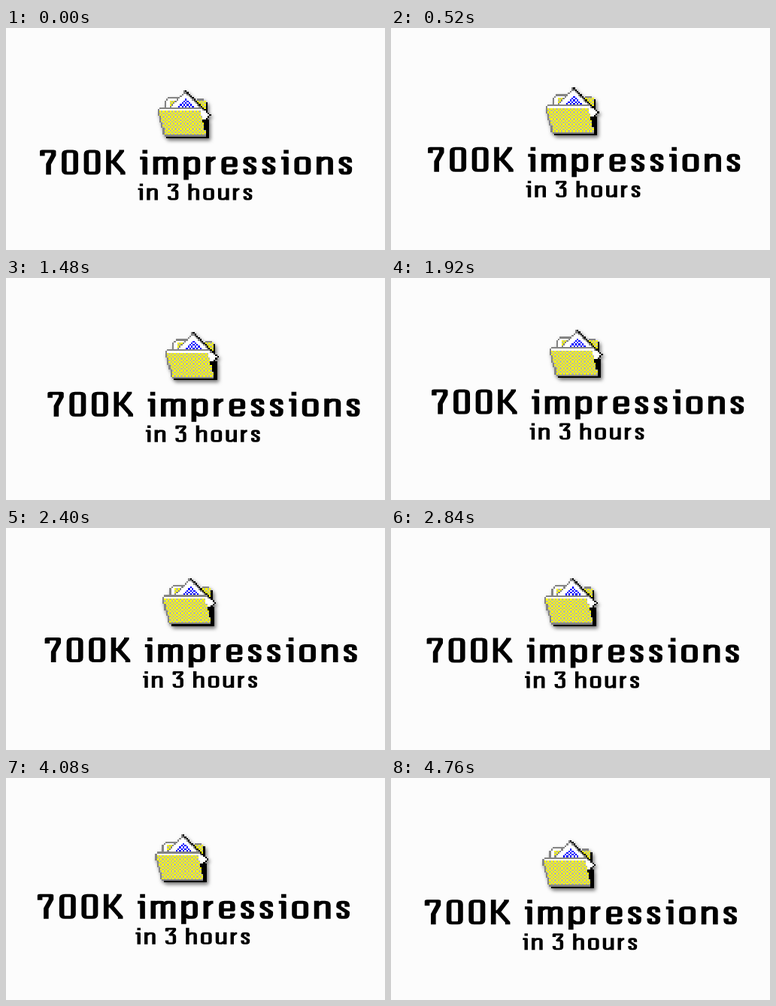
These frames come from a looping animation (504 px wide and 296 px high, 4800 ms). An HTML page with a canvas:

```html
<!DOCTYPE html>
<html lang="en">
<head>
<meta charset="utf-8">
<title>700K impressions</title>
<style>
html, body { margin: 0; width: 100%; height: 100%; overflow: hidden; background: #fcfcfc; }
canvas { display: block; }
</style>
</head>
<body>
<canvas id="stage" width="504" height="296">700K impressions in 3 hours</canvas>
<script>
const ctx = document.getElementById('stage').getContext('2d');
const LOOP = 4800, STEP = 40;

// Drift of the whole group, evenly spaced over one loop.
const driftX = [0, 3, 6.8, 10.2, 10.1, 8.7, 6.6, 3, -1.5, -4.4, -3.5, -1.7];
const driftY = [0, -2.8, -5.7, -8.7, -11.7, -14.4, -16.4, -16.2, -14.2, -11.5, -8.4, -4.2];

function spline(points, phase) {
  const n = points.length, i = Math.floor(phase * n), u = phase * n - i;
  const [a, b, c, d] = [-1, 0, 1, 2].map(k => points[(i + k + n) % n]);
  return b + u / 2 * (c - a + u * (2 * a - 5 * b + 4 * c - d + u * (3 * (b - c) + d - a)));
}

// Centre lines of the letters, drawn with a wide pen; baseline at y = 0.
const PEN = 4, STRETCH = 1.65, GAP = 4.6, SPACE = 11.8;
const arch = 'L4-22H6.8Q9.3-22 9.3-18V';
const glyph = (span, path) => ({ width: span + PEN, path: new Path2D(path) });
const ring = top => `M2.5-${top}H6.8Q9.3-${top} 9.3-${top - 4}V-6Q9.3-2 6.8-2H2.5Q0-2 0-6V-${top - 4}Q0-${top} 2.5-${top}Z`;
const glyphs = {
  7: glyph(9, 'M0-25V-31H9V-26L5-14V0'),
  0: glyph(9.3, ring(31)),
  3: glyph(9, 'M0-26V-31H9V-28L4-19H6.5Q9-19 9-15V-6Q9-2 6.5-2H2.5Q0-2 0-6V-8'),
  K: glyph(11.5, 'M0-33V0M0-17H4M10.5-33V-31L4-17L11.5-3V0'),
  i: glyph(2, 'M-2-22H2V0M2-33V-28'),
  m: glyph(16, 'M0-24V0M0-19L3-22H6Q8-22 8-19V0M8-19L11-22H14Q16-22 16-19V0'),
  n: glyph(9.3, 'M0-24V0M0-18' + arch + '0'),
  h: glyph(9.3, 'M0-33V0M0-18' + arch + '0'),
  p: glyph(9.3, 'M0-24V7M0-18' + arch + '-6Q9.3-2 6.8-2H4L0-6'),
  r: glyph(3.9, 'M0-24V0M0-17L4-22H5.9'),
  e: glyph(9, 'M0-12H9V-18Q9-22 6.5-22H2.5Q0-22 0-18V-6Q0-2 2.5-2H6.5Q9-2 9-6V-7'),
  s: glyph(6.7, 'M6.7-16V-18Q6.7-22 4.5-22H2.2Q0-22 0-18V-16L6.7-9V-6Q6.7-2 4.5-2H2.2Q0-2 0-6V-8'),
  o: glyph(9.3, ring(22)),
  u: glyph(9.3, 'M0-24V-6Q0-2 2.5-2H5L9.3-6M9.3-24V0')
};

function drawText(text, x, baseline, size) {
  ctx.save();
  ctx.translate(x, baseline);
  ctx.scale(size * STRETCH, size);
  ctx.translate(PEN / 2, 0);
  ctx.lineWidth = PEN;
  ctx.lineJoin = 'round';
  for (const char of text) {
    if (char === ' ') {
      ctx.translate(SPACE - GAP, 0);
      continue;
    }
    ctx.stroke(glyphs[char].path);
    ctx.translate(glyphs[char].width + GAP, 0);
  }
  ctx.restore();
}

function makeFolder() {
  const icon = document.createElement('canvas');
  icon.width = 31;
  icon.height = 28;
  const g = icon.getContext('2d');
  const box = (color, x, y, w = 1, h = 1) => {
    g.fillStyle = color;
    g.fillRect(x, y, w, h);
  };
  const checker = (a, b, x, y, w, h = 1) => {
    for (let j = y; j < y + h; j++)
      for (let i = x; i < x + w; i++) box((i + j) % 2 ? a : b, i, j);
  };
  const yellow = '#ffff00', silver = '#bcbc98', gray = '#848484';

  // Back of the folder with its two tabs
  box(gray, 6, 4, 6);
  box(gray, 5, 5);
  box(gray, 4, 6, 1, 5);
  box('#fff', 6, 5, 6);
  box('#fff', 5, 6, 7, 5);
  checker(yellow, silver, 7, 6, 4, 5);
  checker(yellow, silver, 22, 6, 6, 8);
  box(gray, 23, 5, 4);
  box('#000', 28, 7, 1, 20);

  // Tilted sheet
  for (let y = 0; y < 18; y++) {
    const left = y < 12 ? 16 - y : 8 + (y - 12) * 3.2 | 0;
    const right = y < 15 ? 16 + y : 30 - (y - 14);
    box('#fff', left, y, Math.max(0, right - left));
    if (y < 12) box(gray, left, y);
    box('#000', Math.min(right, 30), y);
    if (y < 12) box(gray, right - 1, y);
  }
  for (let y = 5; y < 11; y++) {
    const half = Math.min(4, y - 4);
    checker('#0000ff', '#fff', 16 - half, y, 2 * half + 1);
  }

  // Front panel
  for (let y = 11; y < 26; y++) {
    const left = Math.floor((y - 11) / 3.6);
    const right = 24 + (y - 11 >> 2);
    checker(yellow, silver, left + 1, y, right - left);
    box(gray, left, y);
    if (y > 16) box('#000', right + 1, y, 29 - right);
  }
  box(gray, 1, 10, 24);
  box('#fff', 1, 11, 24);
  box(gray, 4, 26, 24);
  box('#000', 5, 27, 25);
  box('#000', 28, 26, 2);
  return icon;
}

const folder = makeFolder();

function draw(now) {
  const time = Math.floor(now % LOOP / STEP) * STEP;
  const phase = time / LOOP;
  ctx.fillStyle = '#fcfcfc';
  ctx.fillRect(0, 0, 504, 296);
  ctx.save();
  ctx.translate(spline(driftX, phase), spline(driftY, phase));

  ctx.save();
  ctx.imageSmoothingEnabled = false;
  ctx.shadowColor = 'rgba(0, 0, 0, 0.55)';
  ctx.shadowBlur = 5;
  ctx.shadowOffsetX = 2;
  ctx.shadowOffsetY = 3;
  ctx.drawImage(folder, 201.5, 83, 71, 64);
  ctx.restore();

  drawText('700K impressions', 45, 195.5, 1);
  drawText('in 3 hours', 175.5, 229.5, 0.67);
  ctx.restore();
  requestAnimationFrame(draw);
}
requestAnimationFrame(draw);
</script>
</body>
</html>
```
